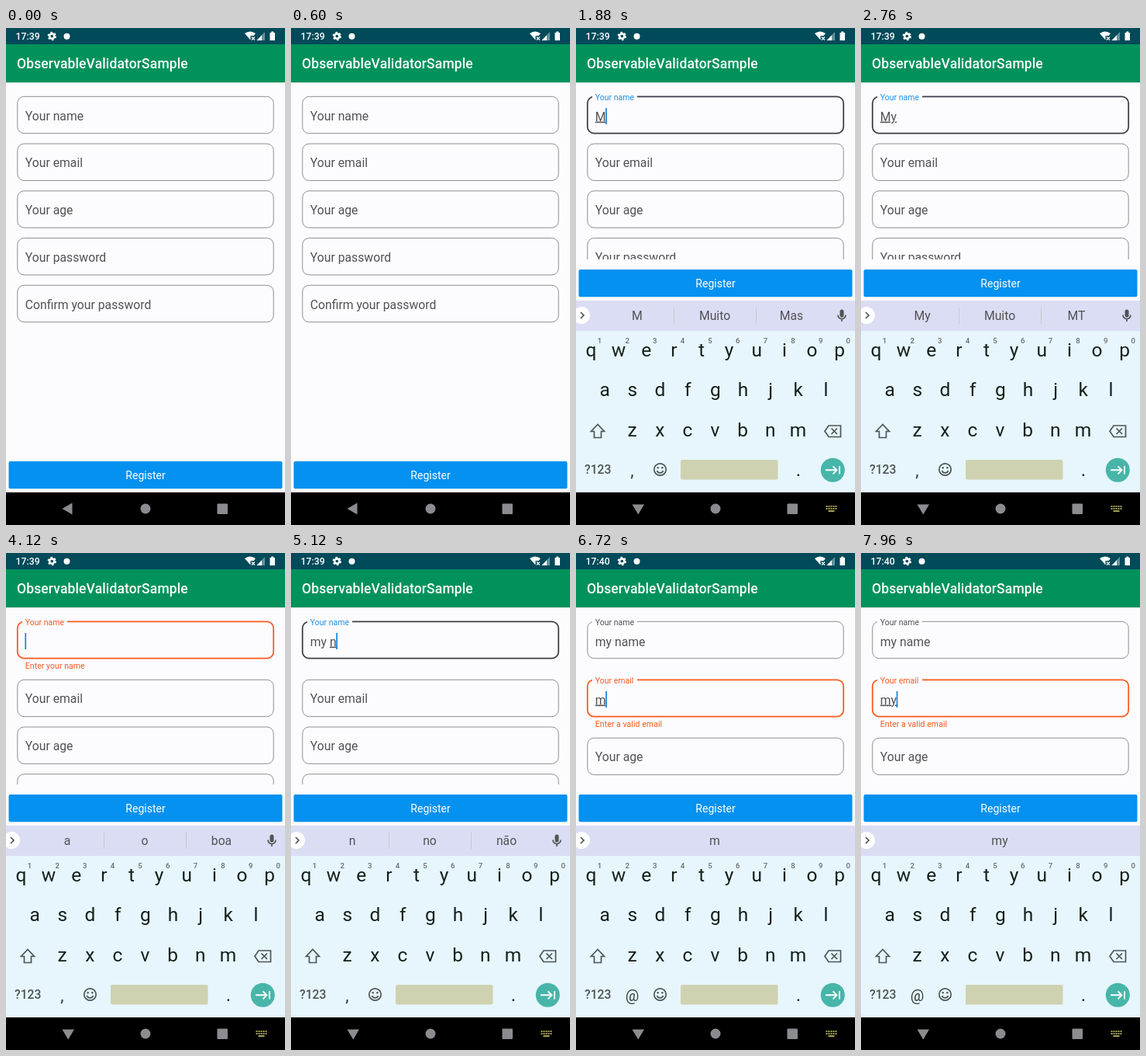
An HTML page for the animation above (8 s loop, 360 by 640 pixels).

```html
<!DOCTYPE html>
<html lang="en">
<head>
<meta charset="utf-8">
<title>Form validation</title>
<style>
  html, body { margin: 0; width: 100%; height: 100%; overflow: hidden; background: #fcfbfe; }
  svg { display: block; width: 100%; height: 100%; }
  text { font-family: Roboto, "Noto Sans", sans-serif; white-space: pre; }
  .mid { text-anchor: middle; }
  .medium { font-weight: 500; }
  .body { font-size: 15.75px; fill: #525254; }
  .box { fill: none; stroke: #8f8e92; }
  .focus .box { stroke: #3e3e48; stroke-width: 1.75; }
  .focus .label { fill: #1a90e4; }
  .invalid .box { stroke: #f75a1c; }
  .invalid .label, .error { fill: #f75a1c; }
  .error { font-size: 10.5px; letter-spacing: .06px; }
  .cursor { fill: #1684d8; }
  .underline { text-decoration: underline; text-decoration-thickness: 1px; }
  .key { font-size: 24.5px; fill: #15201a; }
  .hint { font-size: 9.6px; font-weight: 500; fill: #666b6c; }
  .icon { fill: none; stroke: #4e5554; stroke-width: 1.7; }
</style>
</head>
<body>
<svg viewBox="0 0 360 640">
  <defs>
    <clipPath id="view"><rect id="viewRect" y="70" width="360" height="480"/></clipPath>
  </defs>
  <rect width="360" height="640" fill="#fcfbfe"/>
  <g id="form" clip-path="url(#view)"></g>

  <g id="register">
    <rect x="3.5" y="311" width="353" height="35.3" rx="2" fill="#0491ef"/>
    <text class="mid" x="180" y="334" font-size="14" fill="#fff">Register</text>
  </g>

  <rect width="360" height="21" fill="#014a59"/>
  <rect y="21" width="360" height="49" fill="#00925a"/>
  <rect y="70" width="360" height="1" fill="#dfe5e4"/>
  <text class="medium" x="14" y="52" font-size="17.5" letter-spacing=".12" fill="#fff">ObservableValidatorSample</text>

  <g fill="#fff">
    <text id="clock" class="medium" x="12.6" y="15" font-size="12.25"></text>
    <g transform="translate(59.3 10.5)">
      <circle r="3.1" fill="none" stroke="#fff" stroke-width="2.6"/>
      <circle r="4.7" fill="none" stroke="#fff" stroke-width="2" stroke-dasharray="2.5 2.42"/>
    </g>
    <circle cx="78.5" cy="10.8" r="4"/>
    <path d="M308 7Q315 2 322 7L319.5 10H315.5V15.5Z"/>
    <path d="M317 11.5l4 4m0-4l-4 4" stroke="#fff" stroke-width="1.2"/>
    <path d="M334 5V16H323.5Z" opacity=".4"/>
    <path d="M330 9.2V16H323.5Z"/>
    <path d="M340.5 6H342.3V4.5H345.2V6H347V16H340.5Z"/>
  </g>

  <rect y="598" width="360" height="42"/>
  <g id="keyboard">
    <rect y="351" width="360" height="39" fill="#dbddf5"/>
    <rect y="390" width="360" height="208" fill="#e6f6fc"/>
    <rect y="598" width="360" height="42"/>
    <circle cx="7" cy="370" r="11" fill="#fff"/>
    <path class="icon" d="M6 366l4 4-4 4"/>
    <path id="dividers" d="M126.5 360v21M232.5 360v21" stroke="#c3ccc2"/>
    <g id="suggestions"></g>
    <g id="mic" transform="translate(343 370)">
      <rect x="-2.5" y="-7.5" width="5" height="10" rx="2.5" fill="#4e5554"/>
      <path class="icon" d="M-5-.5a5 5 0 0 0 10 0M0 4.5v3.5"/>
    </g>
    <g id="keys"></g>
    <path class="icon" d="M28 510.5l-8.500 9h4v8h9v-8h4z"/>
    <path class="icon" d="M326 512h15.5v14.5h-15.5l-5-7.25zM329.5 515.5l7.5 7.5m0-7.5l-7.5 7.5"/>
    <text class="medium" x="11" y="574" font-size="15.75" fill="#4e5554">?123</text>
    <text id="comma" class="mid" x="72.5" y="577" fill="#333c38"></text>
    <g transform="translate(108.5 568.5)">
      <circle class="icon" r="7.7"/>
      <path class="icon" d="M-4 1.5a4.2 4.2 0 0 0 8 0"/>
      <circle cx="-2.8" cy="-2.2" r="1.2" fill="#4e5554"/>
      <circle cx="2.8" cy="-2.2" r="1.2" fill="#4e5554"/>
    </g>
    <rect x="135" y="556" width="125.5" height="25.5" rx="2" fill="#ced2b0"/>
    <text class="key mid" x="287" y="577">.</text>
    <circle cx="331.3" cy="569.3" r="15.5" fill="#48b5a9"/>
    <path d="M322 569.3h14.5m-5-5l5 5-5 5M340 564v10.6" fill="none" stroke="#fff" stroke-width="1.9"/>
  </g>

  <g id="nav">
    <path id="back"/>
    <circle cx="180" cy="619" r="6.5"/>
    <rect x="272.5" y="612.5" width="13.5" height="13.5" rx="1"/>
  </g>
  <g id="switcher" fill="#a8a356"></g>
</svg>
<script>
const LOOP = 8000;
const KEYBOARD_AT = 1190, SLIDE = 250, FADE = 160;
const IDLE_WORDS = ['a', 'o', 'boa'];
const LABELS = ['Your name', 'Your email', 'Your age', 'Your password', 'Confirm your password'];
const ERRORS = ['Enter your name', 'Enter a valid email'];
const FOCUS_AT = [1040, 6200];
const ERROR_SPANS = [[3640, 4240], [6560, Infinity]];

// time, field, text, suggestions
const STEPS = [
  [1040, 0, '', IDLE_WORDS],
  [1840, 0, 'M', ['M', 'Muito', 'Mas']],
  [2160, 0, 'My', ['My', 'Muito', 'MT']],
  [3280, 0, 'M', ['M', 'Muito', 'Mas']],
  [3640, 0, '', IDLE_WORDS],
  [4240, 0, 'm', ['m', 'me', 'muito']],
  [4440, 0, 'my', ['my', 'muito', 'mt']],
  [4720, 0, 'my ', IDLE_WORDS],
  [5040, 0, 'my n', ['n', 'no', 'não']],
  [5320, 0, 'my na', ['na', 'não', 'nas']],
  [5560, 0, 'my nam', ['nam', 'não', 'name']],
  [5800, 0, 'my name', ['name', 'nome', 'names']],
  [6200, 1, '', []],
  [6560, 1, 'm', ['m']],
  [6920, 1, 'my', ['my']],
];

const $ = id => document.getElementById(id);
const clamp = v => Math.min(1, Math.max(0, v));
const easeOut = p => 1 - (1 - p) ** 2;

function add(parent, tag, attrs = {}, text = '') {
  const node = document.createElementNS('http://www.w3.org/2000/svg', tag);
  for (const name in attrs) node.setAttribute(name, attrs[name]);
  node.textContent = text;
  return parent.appendChild(node);
}

const show = (node, on) => node.setAttribute('visibility', on ? 'visible' : 'hidden');
function setText(node, text) {
  if (node.textContent !== text) node.textContent = text;
}

const fields = LABELS.map((name, i) => {
  const group = add($('form'), 'g');
  add(group, 'rect', { class: 'box', x: 14.8, y: .3, width: 330.4, height: 47.4, rx: 8.5 });
  const gap = add(group, 'rect', { x: 21, y: -2, width: 58, height: 5, fill: '#fcfbfe' });
  const label = add(group, 'text', { class: 'body label' }, name);
  const value = add(group, 'text', { class: 'body', x: 24.8, y: 31.6 });
  const done = add(value, 'tspan');
  const word = add(value, 'tspan', { class: 'underline' });
  const cursor = add(group, 'rect', { class: 'cursor', y: 15, width: 1.7, height: 21 });
  const error = add(group, 'text', { class: 'error', x: 24.8, y: 60.8 }, ERRORS[i] || '');
  return { group, gap, label, value, done, word, cursor, error };
});

const slots = [79, 179, 278].map(x =>
  add($('suggestions'), 'text', { class: 'body mid', x, y: 376 }));

function addRow(letters, x, y) {
  [...letters].forEach((letter, i) =>
    add($('keys'), 'text', { class: 'key mid', x: x + i * 35.65, y }, letter));
}
addRow('qwertyuiop', 19.4, 423);
addRow('asdfghjkl', 37.2, 474);
addRow('zxcvbnm', 72.6, 526);
[...'1234567890'].forEach((digit, i) =>
  add($('keys'), 'text', { class: 'hint mid', x: 30.5 + i * 35.65, y: 405.5 }, digit));

for (let i = 0; i < 10; i++)
  add($('switcher'), 'rect', { x: 322.5 + i % 5 * 3, y: 615 + Math.floor(i / 5) * 3, width: 2, height: 2 });
add($('switcher'), 'rect', { x: 325.5, y: 621, width: 8, height: 2 });

function drawField(field, i, t, step, top) {
  const focused = step && step[1] === i;
  const last = STEPS.findLast(s => s[0] <= t && s[1] === i);
  const text = last ? last[2] : '';
  const [from, to] = ERROR_SPANS[i] || [Infinity, Infinity];
  const invalid = t >= from && t < to;
  const float = easeOut(clamp((t - (FOCUS_AT[i] ?? Infinity)) / FADE));

  field.group.setAttribute('transform', `translate(0 ${top})`);
  field.group.setAttribute('class', (focused ? 'focus ' : '') + (invalid ? 'invalid' : ''));
  field.label.setAttribute('transform',
    `translate(24.8 ${30.5 - 25.2 * float}) scale(${1 - float / 3})`);
  show(field.gap, float > 0);

  const cut = focused ? text.lastIndexOf(' ') + 1 : text.length;
  setText(field.done, text.slice(0, cut));
  setText(field.word, text.slice(cut));
  const blinkOn = focused && (t - step[0]) % 1000 < 500;
  show(field.cursor, blinkOn);
  if (blinkOn)
    field.cursor.setAttribute('x', 24.4 + (text ? field.value.getComputedTextLength() : 0));
  field.error.setAttribute('opacity', invalid ? clamp((t - from) / FADE) : 0);
  return t >= from;
}

function render(t) {
  const step = STEPS.findLast(s => s[0] <= t);
  const open = t >= KEYBOARD_AT;
  let top = 88;
  fields.forEach((field, i) => {
    const reserved = drawField(field, i, t, step, top);
    top += 60.75 + (reserved ? 14.2 : 0);
  });

  $('viewRect').setAttribute('height', open ? 228 : 480);
  $('register').setAttribute('transform', `translate(0 ${open ? 0 : 247})`);
  setText($('clock'), t < 6000 ? '17:39' : '17:40');

  const slide = easeOut(clamp((t - KEYBOARD_AT) / SLIDE));
  $('keyboard').setAttribute('transform', `translate(0 ${60 * (1 - slide)})`);
  $('keyboard').setAttribute('opacity', clamp(slide * 1.15));
  $('nav').setAttribute('fill', open && slide < 1 ? '#dcdce4' : '#8c8c90');
  $('back').setAttribute('d', open ? 'M72.5 613.5h15.5l-7.75 13z' : 'M85.5 611.5v15l-13-7.5z');
  show($('switcher'), open);

  const words = step ? step[3] : [];
  const shown = words.length === 1 ? ['', words[0], ''] : words;
  slots.forEach((slot, i) => setText(slot, shown[i] || ''));
  show($('dividers'), words.length > 1);
  const emailKeys = t >= FOCUS_AT[1];
  show($('mic'), !emailKeys);
  setText($('comma'), emailKeys ? '@' : ',');
  $('comma').setAttribute('font-size', emailKeys ? 19.5 : 22);
}

const start = performance.now();
function tick() {
  render((performance.now() - start) % LOOP);
  requestAnimationFrame(tick);
}
tick();
</script>
</body>
</html>
```
